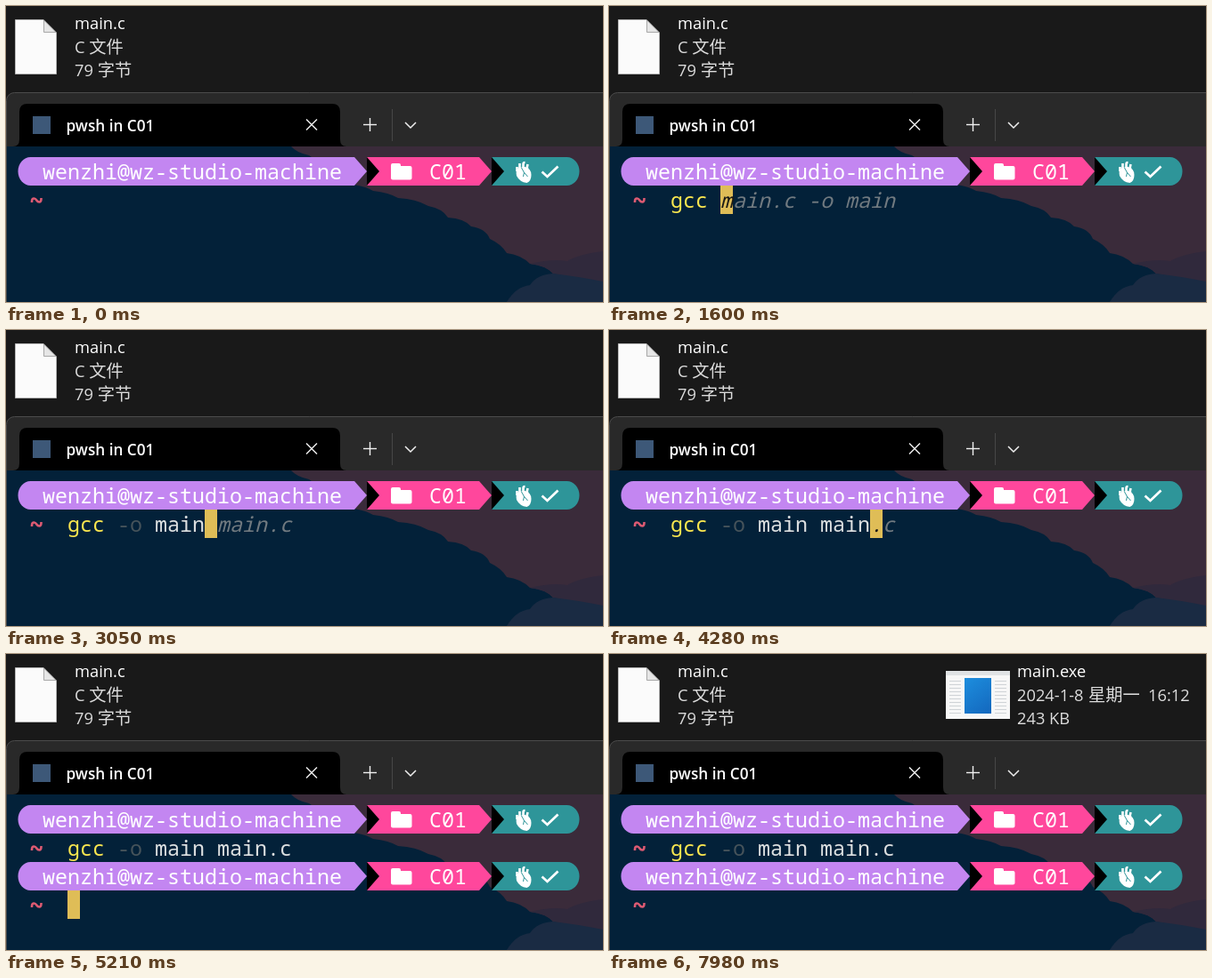
An HTML page with a canvas that plays this animation: 670x333 px, repeating every 8.04 s.

```html
<!DOCTYPE html>
<html lang="zh-CN">
<head>
<meta charset="utf-8">
<title>Compile in a terminal</title>
<style>
  html, body { margin: 0; width: 100%; height: 100%; overflow: hidden; background: #191919; }
  canvas { display: block; width: 670px; height: 333px; }
</style>
</head>
<body>
<canvas id="stage"></canvas>
<script>
const W = 670, H = 333, LOOP = 8040;
const LEFT = 13, TOP = 170, CELL = 14, ROW = 32;
const MONO = '"Noto Sans Mono", "DejaVu Sans Mono", monospace';
const SANS = '"Open Sans", "Noto Sans", sans-serif';
const CJK = '"Noto Sans CJK SC", "Noto Sans CJK", sans-serif';

const HINT = 'gcc main.c -o main';
const COMMAND = 'gcc -o main main.c';
const KEYS = [1050, 1280, 1410, 1600, 1930, 2080, 2350, 2860, 2920, 2990, 3050,
  3630, 4050, 4130, 4200, 4280, 4510, 4610];
const CURSOR_ON = 480, ENTER = 5080, DONE = 5210, BUILT = 6250;
const BLINKS = [[DONE, 5680], [BUILT, 6820], [7360, 7930]];

const canvas = document.getElementById('stage');
const ctx = canvas.getContext('2d');
const ratio = window.devicePixelRatio || 1;
canvas.width = W * ratio;
canvas.height = H * ratio;
ctx.scale(ratio, ratio);

const colX = col => LEFT + col * CELL;
const rowY = row => TOP + row * ROW;

function rect(x, y, w, h, color) {
  ctx.fillStyle = color;
  ctx.fillRect(x, y, w, h);
}

function trace(points) {
  ctx.beginPath();
  points.forEach(([x, y], i) => i ? ctx.lineTo(x, y) : ctx.moveTo(x, y));
}

function poly(points, color) {
  trace(points);
  ctx.closePath();
  ctx.fillStyle = color;
  ctx.fill();
}

function line(points, color, width) {
  trace(points);
  ctx.strokeStyle = color;
  ctx.lineWidth = width;
  ctx.stroke();
}

function shape(d, color) {
  ctx.fillStyle = color;
  ctx.fill(new Path2D(d));
}

function curve(d, x, y, color, width) {
  ctx.save();
  ctx.translate(x, y);
  ctx.strokeStyle = color;
  ctx.lineWidth = width;
  ctx.stroke(new Path2D(d));
  ctx.restore();
}

// Mixed Latin and Chinese label, drawn run by run.
function label(text, x, y, color = '#fff') {
  ctx.fillStyle = color;
  for (const run of text.match(/[\u4e00-\u9fff]+|[^\u4e00-\u9fff]+/g)) {
    ctx.font = run.charCodeAt(0) > 0x4dff ? `300 19.3px ${CJK}` : `18.3px ${SANS}`;
    ctx.fillText(run, x, y);
    x += ctx.measureText(run).width;
  }
}

// Terminal text on the character grid.
function cells(text, col, row, color, style = '') {
  ctx.font = `${style} 500 23.33px ${MONO}`;
  ctx.fillStyle = color;
  [...text].forEach((ch, i) => ctx.fillText(ch, colX(col + i), rowY(row) + 25));
}

function cursor(col, row) {
  rect(colX(col), rowY(row), CELL, ROW, '#dfbd57');
}

function sourceFile() {
  const page = [[10.5, 15.5], [42, 15.5], [56.5, 30], [56.5, 76.5], [10.5, 76.5]];
  poly(page, '#fbfbfb');
  poly([[42, 15.5], [56.5, 30], [42, 30]], '#e6e6e6');
  line([[42.5, 16], [42.5, 29.5], [56, 29.5]], '#a8a8a8', 1);
  line([...page, page[0]], '#b4b4b4', 1);
  label('main.c', 77, 26);
  label('C 文件', 77, 53, '#dcdcdc');
  label('79 字节', 77, 79, '#dcdcdc');
}

function programFile() {
  rect(378, 19, 72, 54, '#f7f7f7');
  rect(378, 19, 72, 5, '#dfe2e4');
  for (let y = 30; y < 68; y += 4) {
    rect(382, y, 13, 1, '#cfd3d6');
    rect(433, y, 13, 1, '#cfd3d6');
  }
  const blue = ctx.createLinearGradient(399, 27, 429, 67);
  blue.addColorStop(0, '#1d8ede');
  blue.addColorStop(1, '#1367bd');
  rect(399, 27, 30, 40, blue);
  label('main.exe', 458, 26);
  label('2024-1-8', 458, 53, '#dcdcdc');
  label('星期一', 538, 53, '#dcdcdc');
  label('16:12', 605, 53, '#dcdcdc');
  label('243 KB', 458, 79, '#dcdcdc');
}

function tabBar() {
  ctx.beginPath();
  ctx.roundRect(.5, 97.5, 690, 260, [9, 0, 0, 0]);
  ctx.fillStyle = '#292929';
  ctx.fill();
  ctx.strokeStyle = '#4b4b4b';
  ctx.lineWidth = 1;
  ctx.stroke();
  shape('M8 158Q15 158 15 150V119Q15 110 24 110H366Q375 110 375 119V150Q375 158 382 158Z', '#000');
  rect(30, 124, 20, 20, '#3d5878');
  ctx.font = `600 17.2px ${SANS}`;
  ctx.fillStyle = '#fff';
  ctx.fillText('pwsh in C01', 67.5, 141);
  line([[337, 127.5], [349, 139.5]], '#f0f0f0', 1.4);
  line([[349, 127.5], [337, 139.5]], '#f0f0f0', 1.4);
  line([[401, 133.5], [416, 133.5]], '#f0f0f0', 1.4);
  line([[408.5, 126], [408.5, 141]], '#f0f0f0', 1.4);
  line([[433.5, 116], [433.5, 152]], '#474747', 1);
  line([[448, 131], [454, 137], [460, 131]], '#f0f0f0', 1.5);
}

function wallpaper() {
  rect(1, 158, W, H - 158, '#032139');
  shape('M320 158Q326 165 340 168Q352 176 362 184Q372 198 390 201Q404 203 412 208' +
    'Q430 210 440 216Q460 217 474 225Q490 228 496 238Q514 239 522 248' +
    'Q538 250 543 262Q556 268 562 278Q578 280 588 290Q606 292 614 301Q640 304 670 318V158Z', '#3a2b3a');
  shape('M588 290Q612 284 630 287Q643 279 670 276V318Q640 304 614 301Q606 292 588 290Z', '#30293c');
  shape('M562 333Q572 316 588 314Q596 302 614 301Q640 304 670 310V333Z', '#1a2b43');
}

function segment(x, end, y, color) {
  poly([[x, y], [end, y], [end + CELL, y + ROW / 2], [end, y + ROW], [x, y + ROW]], color);
}

function notch(x, y) {
  poly([[x, y], [x + CELL, y + ROW / 2], [x, y + ROW]], '#000');
}

function heart(x, y) {
  ctx.save();
  ctx.translate(x, y);
  shape('M4 8Q0 11 1.5 17Q5 24 13 25Q18 23 18 16Q18 9 11 7Z', '#fff');
  ctx.restore();
  curve('M5 9V3M9 9V4Q9 2 11 2M13 9L14 4M2 12V7', x, y, '#fff', 2.6);
  curve('M7 8Q9 13 14 18M10 13L9 18', x, y, '#2e9599', 1);
}

function prompt(row) {
  const y = rowY(row), mid = y + ROW / 2;
  ctx.beginPath();
  ctx.ellipse(27.5, mid, CELL, ROW / 2, 0, Math.PI / 2, Math.PI * 1.5);
  ctx.fillStyle = '#c386f1';
  ctx.fill();
  segment(27, 391, y, '#c386f1');
  segment(405, 531, y, '#ff479c');
  notch(405, y);
  rect(545, y, 85, ROW, '#2e9599');
  ctx.beginPath();
  ctx.ellipse(629.5, mid, CELL, ROW / 2, 0, -Math.PI / 2, Math.PI / 2);
  ctx.fill();
  notch(545, y);

  cells('wenzhi@wz-studio-machine', 2, row, '#fff');
  cells('C01', 33, row, '#fff');
  ctx.beginPath();
  ctx.roundRect(432, y + 7, 11, 9, 2);
  ctx.roundRect(432, y + 10, 23.5, 15.5, 2);
  ctx.fillStyle = '#fff';
  ctx.fill();
  heart(571.5, y + 4);
  line([[601.5, y + 16.5], [607.5, y + 22], [619.5, y + 10.5]], '#fff', 2.7);
  curve('M1 6V5Q1 1.5 3.5 1.5Q5 1.5 6.3 3.5T9.3 5.5Q11.5 5.5 11.5 2V1',
    28, y + ROW + 13, '#dc5a72', 2.6);
}

function commandLine(t) {
  const typed = KEYS.filter(k => k <= t).length;
  const text = typed < 5 ? HINT : COMMAND;
  const col = 4 + typed;
  const active = t >= CURSOR_ON && t < ENTER;

  cells(text.slice(0, Math.min(typed, 3)), 4, 1, '#f9e64f');
  if (typed > 4) {
    cells(text.slice(4, Math.min(typed, 6)), 8, 1, typed > 5 ? '#46535a' : '#dcdfe0');
    cells(text.slice(6, typed), 10, 1, '#dcdfe0');
  }
  if (typed) cells(text.slice(typed + 1), col + 1, 1, '#717a80', 'italic');
  if (active) {
    cursor(col, 1);
    if (typed) cells(text.slice(typed, typed + 1), col, 1, '#1b1a16', 'italic');
  }
}

function draw(t) {
  rect(0, 0, W, H, '#191919');
  sourceFile();
  if (t >= BUILT) programFile();
  tabBar();
  wallpaper();
  prompt(0);
  commandLine(t);
  if (t >= DONE) prompt(2);
  if (BLINKS.some(([on, off]) => t >= on && t < off)) cursor(4, 3);
}

const start = performance.now();
function tick() {
  draw((performance.now() - start) % LOOP);
  requestAnimationFrame(tick);
}
tick();
</script>
</body>
</html>
```
